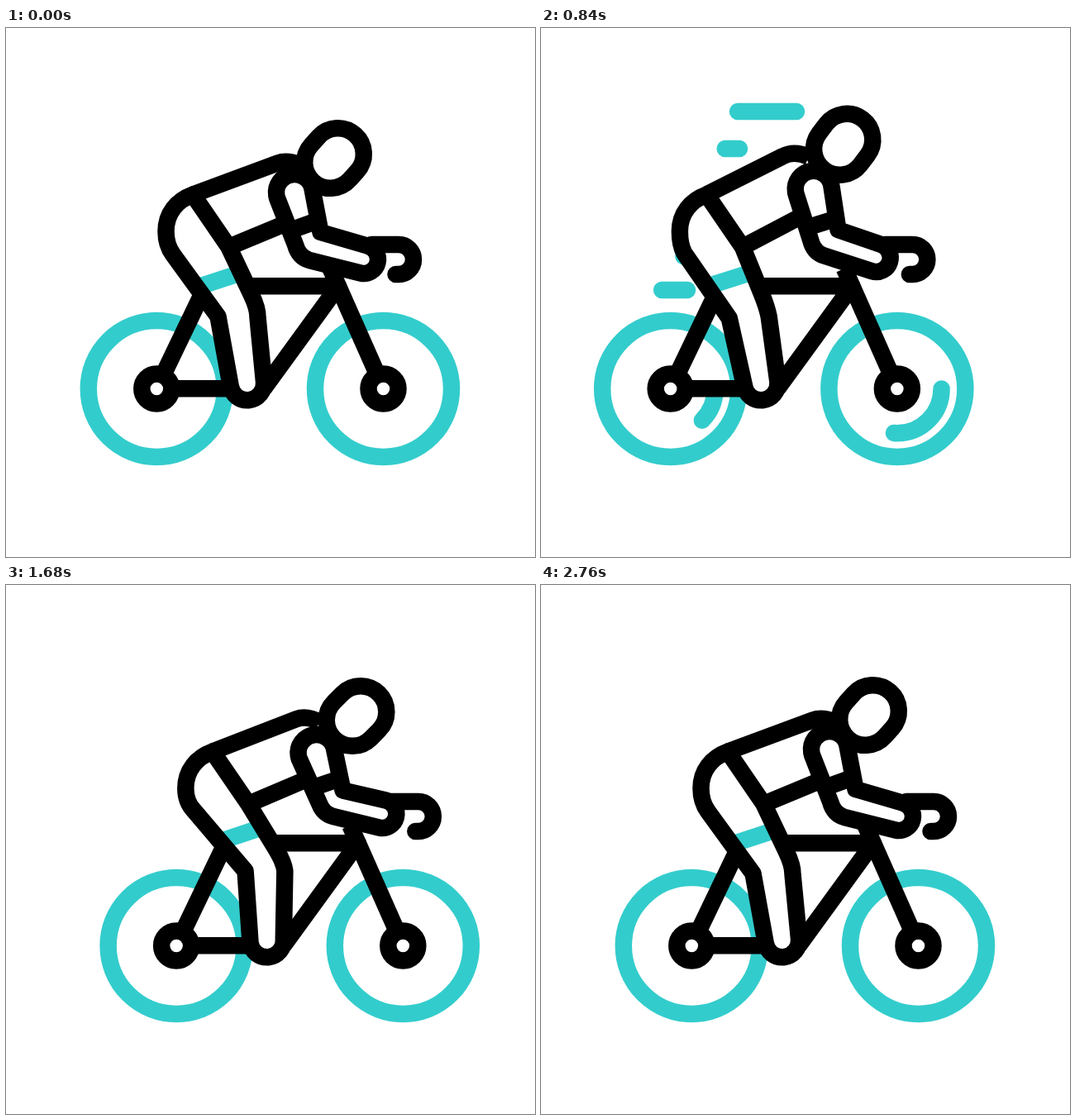
Write an HTML page with a canvas that moves like this. It is 640 px wide and 640 px high and loops after 3000 ms.

```html
<!DOCTYPE html>
<html lang="en">
<head>
<meta charset="utf-8">
<title>Cyclist</title>
<style>
  html, body { margin: 0; height: 100%; overflow: hidden; background: #fff; }
  canvas { display: block; width: 100vw; height: 100vh; }
</style>
</head>
<body>
<canvas id="stage" width="640" height="640"></canvas>
<script>
const ctx = document.getElementById('stage').getContext('2d');
const LOOP = 3000, STEP = 40, WIDTH = 20.5;
const INK = '#000', TEAL = '#33cccc', PAPER = '#fff';
const REAR = [182.3, 436.5], FRONT = [456.5, 436.5];
const WAIST = [269.5, 265], HIP = [226, 201.5], FOOT = [291.8, 430];

// Each joint in three poses: rest, upright, leaning forward
const JOINTS = {
  headTop:   [[401.5, 152.5], [391.2, 126.5], [408.2, 159.3]],
  headLow:   [[392.5, 162.5], [383.2, 138.5], [397.8, 168.9]],
  back:      [[328.5, 163.5], [313.7, 152], [330.2, 164.5]],
  nape:      [[340, 159.5], [328, 143.5], [342.6, 160.5]],
  neck:      [[354, 165], [346.7, 151], [357.6, 169.2]],
  kneeBack:  [[256.5, 349], [247.7, 353.5], [269.6, 344.4]],
  thigh:     [[202, 274], [196.7, 272], [205.2, 273.2]],
  kneeTop:   [[297, 323], [287.5, 322], [306.3, 319.6]],
  kneeLow:   [[304.5, 350], [295.5, 350], [317.4, 345.1]],
  belly:     [[337, 237], [340.5, 224.5], [338, 238]],
  hemLeft:   [[236, 312], [231.7, 311], [240.2, 308.6]],
  hemRight:  [[282, 297], [275, 297.5], [282, 294.5]],
  cuffLeft:  [[341, 246], [347, 240], [346, 247]],
  cuffRight: [[380, 232], [384, 229], [383, 234]],
  shoulder:  [[349, 199], [357, 191], [350.6, 205.6]],
  armLow:    [[350, 262], [352, 259], [356.3, 266.3]],
  elbow:     [[354, 277], [356, 270], [360.9, 277.9]],
  forearm:   [[367, 281], [367, 273.6], [371.9, 281]],
  crook:     [[380.5, 247], [385.7, 242], [383.3, 249.9]],
  hand:      [[433, 280], [431.2, 278.5], [431.6, 276.7]]
};

// time, ride offset, pose
const KEYS = [
  [0, 0, 0], [600, -47.3, 1], [1316, 35.5, 2],
  [1520, 35.5, 2], [2120, -31.1, 1], [2760, 0, 0], [LOOP, 0, 0]
];

// y, right end, left end
const STREAKS = [[101, 309, 38], [146, 240, 174], [276, 177, 159], [317, 177, 59]];

const mix = (a, b, k) => a + (b - a) * k;
const ease = (t, from, to) => {
  const u = Math.min(1, Math.max(0, (t - from) / (to - from)));
  return u * u * (3 - 2 * u);
};

function stroke(color, cap = 'butt') {
  ctx.strokeStyle = color;
  ctx.lineCap = cap;
  ctx.stroke();
}

function line(points, color = INK, cap) {
  ctx.beginPath();
  points.forEach(p => ctx.lineTo(...p));
  stroke(color, cap);
}

function ring([x, y], r, color, from = 0, to = 2 * Math.PI) {
  ctx.beginPath();
  ctx.arc(x, y, r, from, to);
  stroke(color, 'round');
}

function outline() {
  ctx.closePath();
  ctx.fillStyle = PAPER;
  ctx.fill();
  stroke(INK);
}

function drawStreaks(head, tail) {
  for (const [y, right, left] of STREAKS) {
    line([[mix(right, left, tail), y], [mix(right, left, head), y]], TEAL, 'round');
  }
}

function drawBike(head, tail) {
  for (const hub of [REAR, FRONT]) ring(hub, 82.5, TEAL);
  if (head > tail) {
    ring(REAR, 54, TEAL, 3 * tail, 3 * head);
    ring(FRONT, 53.7, TEAL, 2 * Math.PI * tail, 2 * Math.PI * head);
  }
  line([[190, 420], [238, 320]]);
  line([[206, 436.3], [275, 436.3]]);
  line([[284, 312.3], [402, 312.3], [312, 436]]);
  line([[392.5, 291], [448.5, 417.5]]);
  for (const hub of [REAR, FRONT]) ring(hub, 18, INK);
}

function drawLeg(p) {
  const [kx, ky] = p.kneeTop;
  ctx.beginPath();
  ctx.moveTo(...HIP);
  ctx.lineTo(...WAIST);
  ctx.lineTo(kx, ky);
  ctx.quadraticCurveTo(mix(WAIST[0], kx, 1.28), mix(WAIST[1], ky, 1.28), ...p.kneeLow);
  ctx.arc(...FOOT, 20.3, -0.1, Math.PI - 0.15);
  ctx.lineTo(...p.kneeBack);
  ctx.lineTo(...p.thigh);
  ctx.quadraticCurveTo(193.5, 262.5, 193.5, 246);
  ctx.bezierCurveTo(193.5, 224, 207, 208.5, ...HIP);
  ctx.closePath();
  ctx.fillStyle = PAPER;
  ctx.fill();
  const shape = [p.hemLeft, p.hemRight];
  ctx.save();
  const leg = legPath(p);
  ctx.clip(leg);
  line(shape, TEAL);
  ctx.restore();
  ctx.strokeStyle = INK;
  ctx.stroke(leg);
}

function legPath(p) {
  const [kx, ky] = p.kneeTop, path = new Path2D();
  path.moveTo(...HIP);
  path.lineTo(...WAIST);
  path.lineTo(kx, ky);
  path.quadraticCurveTo(mix(WAIST[0], kx, 1.28), mix(WAIST[1], ky, 1.28), ...p.kneeLow);
  path.arc(...FOOT, 20.3, -0.1, Math.PI - 0.15);
  path.lineTo(...p.kneeBack);
  path.lineTo(...p.thigh);
  path.quadraticCurveTo(193.5, 262.5, 193.5, 246);
  path.bezierCurveTo(193.5, 224, 207, 208.5, ...HIP);
  path.closePath();
  return path;
}

function drawTorso(p) {
  ctx.beginPath();
  ctx.moveTo(...HIP);
  ctx.lineTo(...p.back);
  ctx.quadraticCurveTo(...p.nape, ...p.neck);
  stroke(INK);
  line([WAIST, p.belly]);
}

function drawHead(p) {
  const tilt = Math.atan2(p.headTop[1] - p.headLow[1], p.headTop[0] - p.headLow[0]);
  const side = tilt + Math.PI / 2;
  ctx.beginPath();
  ctx.arc(...p.headTop, 31.3, side - Math.PI, side);
  ctx.arc(...p.headLow, 31.3, side, side + Math.PI);
  outline();
}

function drawArm(p) {
  const dx = p.hand[0] - p.forearm[0], dy = p.hand[1] - p.forearm[1];
  const tilt = Math.atan2(dy, dx) + Math.asin(17 / Math.hypot(dx, dy));
  ctx.beginPath();
  ctx.arc(...p.shoulder, 22, -0.15, Math.PI - 0.32, true);
  ctx.lineTo(...p.armLow);
  ctx.quadraticCurveTo(...p.elbow, ...p.forearm);
  ctx.arc(...p.hand, 17, tilt + Math.PI / 2, tilt - Math.PI / 2, true);
  ctx.lineTo(...p.crook);
  outline();
  line([p.cuffLeft, p.cuffRight]);
}

function drawHandlebar() {
  ctx.beginPath();
  ctx.moveTo(442, 262);
  ctx.arc(475, 280, 18, -Math.PI / 2, Math.PI / 2);
  ctx.lineTo(471.5, 298);
  stroke(INK, 'round');
}

function poseAt(from, to, k) {
  const pose = {};
  for (const name in JOINTS) {
    const a = JOINTS[name][from], b = JOINTS[name][to];
    pose[name] = [mix(a[0], b[0], k), mix(a[1], b[1], k)];
  }
  return pose;
}

function draw(t) {
  const i = KEYS.findIndex(key => key[0] > t);
  const [t0, x0, p0] = KEYS[i - 1], [t1, x1, p1] = KEYS[i];
  const k = ease(t, t0, t1), pose = poseAt(p0, p1, k);
  const head = ease(t, 600, 1316), tail = ease(t, 1316, 1640);

  ctx.fillStyle = PAPER;
  ctx.fillRect(0, 0, 640, 640);
  ctx.lineWidth = WIDTH;
  ctx.lineJoin = 'round';
  if (head > tail) drawStreaks(head, tail);

  ctx.save();
  ctx.translate(mix(x0, x1, k), 0);
  drawBike(head, tail);
  drawLeg(pose);
  drawTorso(pose);
  drawHead(pose);
  drawArm(pose);
  drawHandlebar();
  ctx.restore();
}

const start = performance.now();
function tick() {
  const t = (performance.now() - start) % LOOP;
  draw(Math.floor(t / STEP) * STEP);
  requestAnimationFrame(tick);
}
tick();
</script>
</body>
</html>
```
